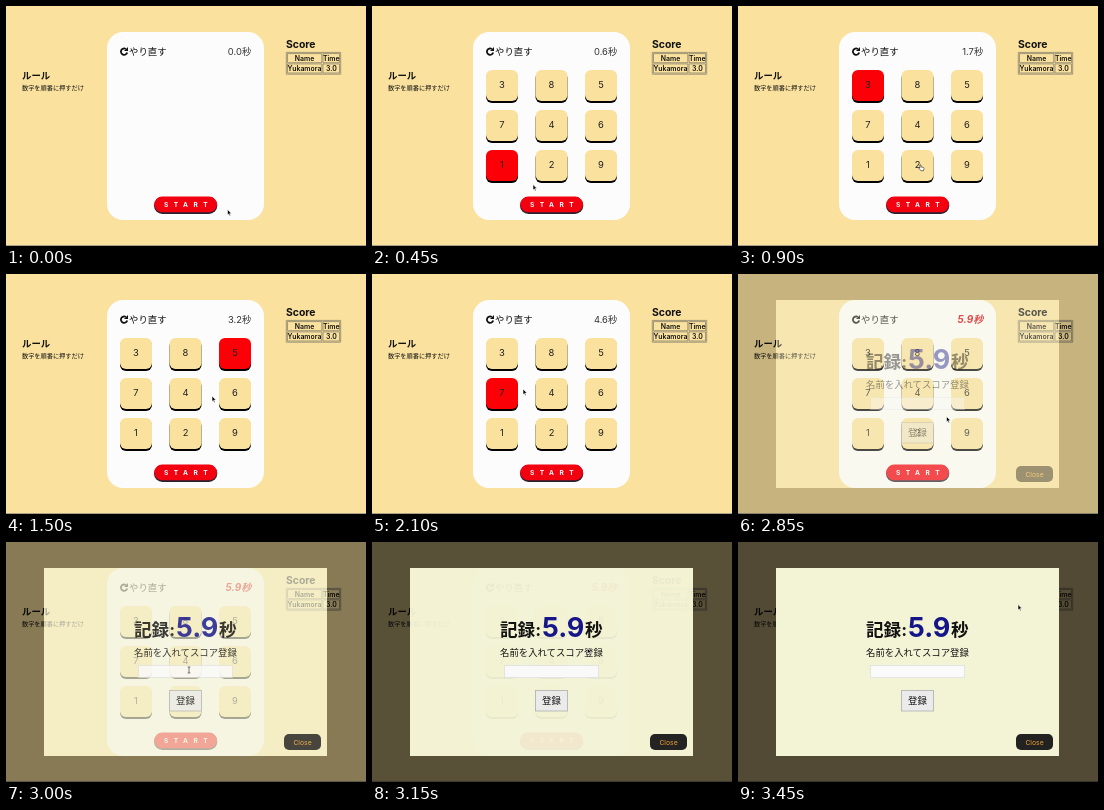
An HTML page that plays this animation: 360 by 240 pixels, repeating every 3.6 s.

```html
<!DOCTYPE html>
<html lang="ja">
<meta charset="utf-8">
<title>Number order game</title>
<style>
  html, body { margin: 0; height: 100%; overflow: hidden; background: #fae19e; }
  svg { display: block; width: 360px; height: 240px; }
  text { font: 9.4px Inter, "Noto Sans CJK JP", sans-serif; fill: #111; white-space: pre; }
  .b { font-weight: bold; }
  .mid { text-anchor: middle; }
  .cell { font-size: 6.9px; font-weight: 600; text-anchor: middle; }
  .num { font-size: 9.4px; fill: #222; text-anchor: middle; }
  #timer { fill: #333; text-anchor: end; }
  #timer.done { font-size: 10px; font-weight: bold; font-style: italic; fill: #d7000f; }
</style>
<svg viewBox="0 0 360 240">
  <rect width="360" height="240" fill="#fae19e"/>
  <rect y="239" width="360" height="1" fill="#aaa089"/>

  <text class="b" x="16" y="73">ルール</text>
  <text x="16" y="84" style="font-size:6.2px;font-weight:500">数字を順番に押すだけ</text>

  <text class="b" x="280" y="42" style="font-size:10.4px">Score</text>
  <g fill="none" stroke="#8c846c" stroke-width=".8">
    <path d="M280.3 46.4H334.7V68.2H280.3Z"/>
    <path d="M281.5 47.6H315.8V56.7H281.5ZM317 47.6H333.5V56.7H317ZM281.5 57.9H315.8V67H281.5ZM317 57.9H333.5V67H317Z"/>
  </g>
  <text class="cell" x="298.5" y="54.6">Name</text>
  <text class="cell" x="325.3" y="54.6">Time</text>
  <text class="cell" x="298.5" y="64.9">Yukamora</text>
  <text class="cell" x="325.3" y="64.9">3.0</text>

  <rect x="101" y="26" width="157" height="188" rx="16" fill="#fcfcfc"/>
  <path d="M119.8 42.9A3.2 3.2 0 1 0 121.2 46.5" fill="none" stroke="#111" stroke-width="1.8"/>
  <path d="M122 41V45H118Z" fill="#111"/>
  <text x="123" y="49">やり直す</text>
  <text id="timer" x="245.3" y="49"></text>
  <g id="tiles"></g>

  <rect x="148" y="191" width="63.3" height="17" rx="8.5" fill="#2b2030"/>
  <rect x="148.3" y="190.6" width="62.7" height="15.6" rx="7.8" fill="#f20010"/>
  <text class="b" x="158" y="201" style="font-size:6.6px;letter-spacing:5.5px;fill:#fff">START</text>

  <g id="backdrop">
    <path d="M0 0H360V240H0ZM38 26V214H321V26Z" fill-rule="evenodd" fill-opacity=".67"/>
    <rect x="38" y="26" width="283" height="188" fill="#f3f3d6"/>
  </g>
  <g id="content">
    <text class="b" x="128" y="93.7" style="font-size:17.6px">記録:</text>
    <text class="b" x="170" y="94.5" style="font-size:27px;fill:#15158a">5.9</text>
    <text class="b" x="213" y="93.7" style="font-size:17.6px">秒</text>
    <text x="128" y="113.5">名前を入れてスコア登録</text>
    <rect x="132.5" y="123.5" width="94" height="12" fill="#fafafa" stroke="#ddd" stroke-width=".7"/>
    <rect x="163.5" y="148.5" width="32" height="20.5" fill="#ebebeb" stroke="#b5b5b5" stroke-width=".9"/>
    <text class="mid" x="179.5" y="162">登録</text>
    <rect x="278" y="192" width="37" height="16" rx="5" fill="#222"/>
    <text class="mid" x="296.5" y="202.6" style="font-size:6.8px;fill:#f0a030">Close</text>
  </g>

  <path id="cursor" stroke-width=".6" stroke-linejoin="round"/>
</svg>
<script>
  const LOOP = 3600, STEP = 150, START = 2, END = 18;
  const $ = id => document.getElementById(id);
  const order = [3, 8, 5, 7, 4, 6, 1, 2, 9];
  const clicks = [4, 6, 8, 10, 12, 14, 15, 16, END];   // step at which 1..9 are pressed
  const tileX = i => 114 + i % 3 * 49.5;
  const tileY = i => 64 + Math.floor(i / 3) * 40;

  // Pointer waypoints: step, x, y
  const path = [[0, 221.5, 203.5], [2, 190, 199], [4, 132, 158], [6, 181.5, 158.5], [8, 133, 80],
    [9, 181, 118], [10, 206, 122], [12, 231, 80], [13, 229, 118], [14, 151, 115], [15, 134, 118],
    [16, 182, 80], [18, 234, 157], [20, 183, 128], [23, 280, 62.5]];
  const shapes = {
    arrow: ['M0 0V5.6L1.3 4.4 2.2 6.4 3.1 6 2.2 4.1H4Z', '#000', '#fff'],
    hand: ['M.4 .5Q1 -.2 1.5 .5V2.4L4 3Q4.6 3.2 4.5 4.2L4 6.2H1.3L-.6 3.7Q-.5 3 .4 3.6Z', '#fff', '#222'],
    beam: ['M-1.3 -3H1.3M0 -3V3M-1.3 3H1.3', 'none', '#222']
  };

  $('tiles').innerHTML = order.map((n, i) => {
    const x = tileX(i), y = tileY(i);
    return `<rect x="${x}" y="${y + 2}" width="32" height="31" rx="6"/>
      <rect id="tile${n}" x="${x}" y="${y}" width="32" height="31" rx="6"/>
      <text class="num" x="${x + 16}" y="${y + 18.4}">${n}</text>`;
  }).join('');

  function pointerAt(step) {
    const i = Math.max(1, path.findIndex(p => p[0] >= step));
    const [s0, x0, y0] = path[i - 1], [s1, x1, y1] = path[i];
    const f = (step - s0) / (s1 - s0);
    return [x0 + (x1 - x0) * f, y0 + (y1 - y0) * f];
  }

  function pointerShape(step, x, y) {
    if (step === 20) return shapes.beam;
    const overTile = order.some((_, i) =>
      x > tileX(i) && x < tileX(i) + 32 && y > tileY(i) && y < tileY(i) + 33);
    const overStart = x > 148 && x < 211 && y > 191 && y < 208;
    return step < END && (overStart || step >= START && overTile) ? shapes.hand : shapes.arrow;
  }

  function draw(step) {
    const seconds = Math.min(5.9, .3625 * step - .425);
    $('timer').textContent = (step < START ? 0 : Math.floor(seconds * 10 + .01) / 10).toFixed(1) + '秒';
    $('timer').setAttribute('class', step >= END ? 'done' : '');

    $('tiles').style.display = step < START ? 'none' : '';
    const next = 1 + clicks.filter(c => c <= step).length;
    for (const n of order) $('tile' + n).setAttribute('fill', n === next ? '#fb0007' : '#fae19e');

    const progress = Math.min(1, Math.max(0, (step * STEP - 2622) / 610));
    const fade = .5 - .5 * Math.cos(Math.PI * progress);
    $('backdrop').setAttribute('opacity', fade);
    $('content').setAttribute('opacity', 1 - (1 - fade) ** 1.5);

    const [x, y] = pointerAt(step);
    const [d, fill, stroke] = pointerShape(step, x, y);
    const attrs = { d, fill, stroke, transform: `translate(${x} ${y})` };
    for (const name in attrs) $('cursor').setAttribute(name, attrs[name]);
  }

  function tick() {
    draw(Math.floor(performance.now() % LOOP / STEP));
    requestAnimationFrame(tick);
  }
  tick();
</script>
</html>
```
